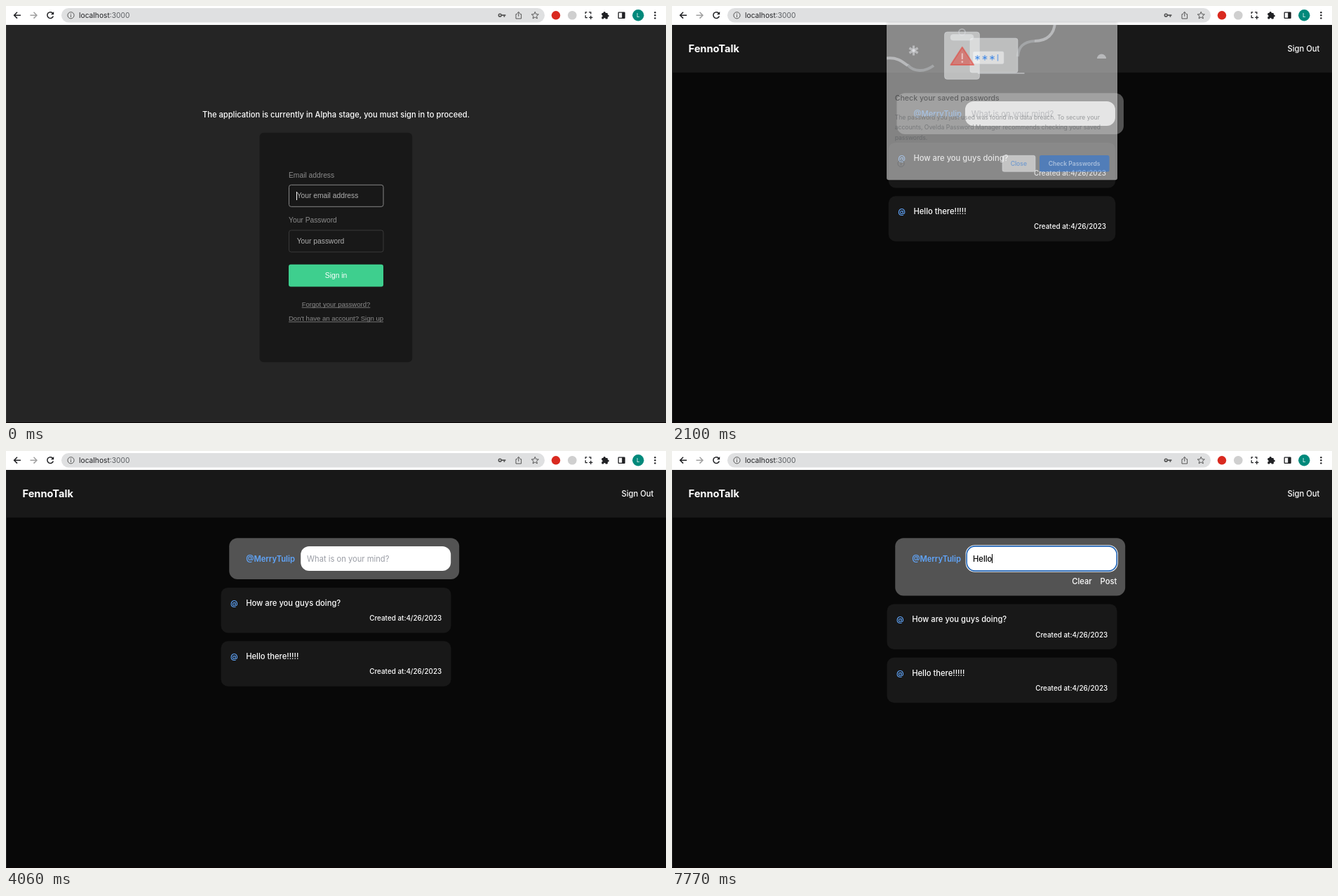
Recreate the animation shown at these times as an HTML page with a canvas. Size 941 by 595 pixels, loop 8 s.

```html
<!DOCTYPE html>
<html lang="en">
<head>
<meta charset="utf-8">
<title>Chat sign in</title>
<style>
html, body { margin: 0; width: 100%; height: 100%; overflow: hidden; background: #080808; }
canvas { display: block; width: 941px; height: 595px; }
</style>
</head>
<body>
<canvas id="stage" width="941" height="595"></canvas>
<script>
const c = document.getElementById('stage').getContext('2d');
const LOOP = 8000, STEP = 70;
const UI = 'Inter, "Open Sans", sans-serif';
const FORM = '"Liberation Sans", Arial, sans-serif';
const USER = '@MerryTulip';

const ramp = (t, from, to) => Math.min(1, Math.max(0, (t - from) / (to - from)));
const within = (t, from, to) => t >= from && t < to;

function box(x, y, w, h, r, fill, stroke, line = 1) {
  c.beginPath();
  c.roundRect(x, y, w, h, r);
  if (fill) { c.fillStyle = fill; c.fill(); }
  if (stroke) { c.strokeStyle = stroke; c.lineWidth = line; c.stroke(); }
}

function disc(x, y, r, fill) {
  c.beginPath();
  c.arc(x, y, r, 0, Math.PI * 2);
  c.fillStyle = fill;
  c.fill();
}

function ring(x, y, r, color, line = 1) {
  c.beginPath();
  c.arc(x, y, r, 0, Math.PI * 2);
  c.strokeStyle = color;
  c.lineWidth = line;
  c.stroke();
}

function path(d, color, line = 1.4) {
  c.strokeStyle = color;
  c.lineWidth = line;
  c.stroke(new Path2D(d));
}

function text(s, x, y, size, color, { weight = 400, family = UI, align = 'left' } = {}) {
  c.font = `${weight} ${size}px ${family}`;
  c.fillStyle = color;
  c.textAlign = align;
  c.fillText(s, x, y);
  return c.measureText(s).width;
}

function caret(x, y, h, color) {
  c.fillStyle = color;
  c.fillRect(x, y, 1, h);
}

function infoIcon(x, y, color) {
  ring(x, y, 4.6, color, 1);
  c.fillStyle = color;
  c.fillRect(x - 0.5, y - 0.5, 1, 3);
  c.fillRect(x - 0.5, y - 2.5, 1, 1.1);
}

function star(x, y, r) {
  c.beginPath();
  for (let i = 0; i < 10; i++) {
    const a = -Math.PI / 2 + i * Math.PI / 5, d = i % 2 ? r * 0.45 : r;
    c.lineTo(x + d * Math.cos(a), y + d * Math.sin(a));
  }
  c.closePath();
  c.strokeStyle = '#555';
  c.lineWidth = 1;
  c.stroke();
}

function toolbar() {
  const dark = '#202124', mid = '#555';
  c.fillStyle = '#fff';
  c.fillRect(0, 0, 941, 27);
  path('M21 13.2H11.8M16 8.8L11.6 13.2L16 17.6', dark, 1.5);
  path('M34.5 13.2H43.7M39.5 8.8L43.9 13.2L39.5 17.6', '#a0a0a0', 1.5);
  path('M66.8 10.4A4.4 4.4 0 1 0 67.4 14.6', dark, 1.5);
  c.fillStyle = dark;
  c.fill(new Path2D('M68.2 8V12.3H63.9Z'));

  box(79, 3, 689, 20.5, 10.2, '#dfe0e1');
  infoIcon(92.5, 13.3, mid);
  const host = text('localhost', 104, 17, 10.25, '#202124');
  text(':3000', 104 + host, 17, 10.25, '#5b5e62');

  ring(704.3, 13.2, 1.9, mid, 1.6);
  path('M706.3 13.2H712.4M710.4 13.2V15.7', mid, 1.7);
  path('M728.7 11.6H727V18H734.6V11.6H732.9M730.8 15V8.7M728.6 10.7L730.8 8.5L733 10.7', mid, 1);
  star(754.3, 13.6, 5.3);

  disc(784, 13.3, 6.2, '#d9291f');
  disc(807.3, 13.3, 6.3, '#cfcfcf');
  path('M826.2 11V8.8H828.4M831 8.8H833.8V11.4M826.2 13.2V16.6H829M833.8 13.8V19M831.2 16.4H836.4', dark, 1.3);

  box(849.3, 10, 8.6, 8.4, 1, dark);
  disc(853.2, 9.6, 1.6, dark);
  disc(858.2, 14, 1.6, dark);
  disc(849.2, 14.3, 1.3, '#fff');
  disc(853.4, 18.4, 1.3, '#fff');
  box(873.2, 9.2, 8.8, 8.2, 0.5, '#fff', dark, 1.3);
  c.fillStyle = dark;
  c.fillRect(878.2, 9, 4, 8.6);
  disc(901.3, 13.2, 8.2, '#00897b');
  text('L', 901.3, 16.2, 8, '#fff', { align: 'center' });
  for (const y of [9.2, 13.3, 17.4]) disc(925.4, y, 1.2, dark);
}

function pageEdges(color) {
  c.fillStyle = color;
  c.fillRect(0, 27, 1, 568);
  c.fillStyle = '#0c0505';
  c.fillRect(0, 594, 941, 1);
}

function link(s, y) {
  const w = text(s, 470.5, y, 9.55, '#8b8b8b', { family: FORM, align: 'center' });
  c.fillRect(470.5 - w / 2, y + 1.2, w, 0.8);
}

function field(y, placeholder, focused, filled) {
  box(403.5, y, 134.5, 31, 3, filled ? '#e8f0fe' : '#181818', focused ? '#858585' : filled ? '#3c3c3c' : '#393939');
  if (!filled) text(placeholder, 414.7, y + 19, 10.29, '#b0b0b0', { family: FORM });
}

function login(t) {
  const filled = t >= 280, sending = t >= 1260;
  const label = { family: FORM };
  c.fillStyle = '#252525';
  c.fillRect(0, 27, 941, 568);
  pageEdges('#343434');
  text('The application is currently in Alpha stage, you must sign in to proceed.',
    470.5, 158.5, 11.17, '#fff', { weight: 500, align: 'center' });
  box(361.5, 180.7, 217.8, 327.5, 6, '#181818');

  text('Email address', 403, 244.6, 10.29, '#8b8b8b', label);
  field(255.3, 'Your email address', !sending, filled);
  text('Your Password', 403, 309.3, 10.29, '#8b8b8b', label);
  field(320, 'Your password', false, filled);
  if (filled) {
    c.save();
    c.beginPath();
    c.rect(414, 256, 112.5, 30);
    c.clip();
    text('norvatoybox.com@pos', 414.7, 274.3, 10.29, '#000', label);
    c.restore();
    for (let i = 0; i < 9; i++) disc(416.6 + i * 8, 335, 1.25, '#111');
  }
  if (t < 980) caret(414, 265, 12, filled ? '#000' : '#fff');

  c.globalAlpha = 1 - 0.3 * ramp(t, 1260, 1470);
  box(403, 368.8, 135, 31.6, 3, '#3ecf8e');
  text(sending ? 'Signing in ...' : 'Sign in', 470.5, 388.2, 10.29, '#fff', { family: FORM, align: 'center' });
  c.globalAlpha = 1;

  link('Forgot your password?', 428.6);
  link("Don't have an account? Sign up", 449.2);
}

function message(x, y, w, body, hovered) {
  if (hovered) {
    box(x + 1.5, y + 1.2, w, 64.5, 10, '#1c0c0c');
    box(x + 0.8, y + 0.8, w - 1.6, 62.9, 9.5, '#181818', '#ef4444', 1.5);
  } else {
    box(x, y, w, 64.5, 10, '#181818');
  }
  text('@', x + 13.5, y + 26, 10.6, '#60a5fa', { weight: 600 });
  text(body, x + 35.7, y + 26, 11.2, '#fff', { weight: 500 });
  text('Created at:4/26/2023', x + w - 13.3, y + 47.2, 9.88, '#fff', { weight: 500, align: 'right' });
}

function typed(t) {
  const keys = [6510, 7210, 7420, 7560, 7770];
  return 'Hello'.slice(0, keys.filter(k => t >= k).length);
}

function composer(t, nameWidth) {
  const entry = typed(t);
  const w = nameWidth + 262, x = 482.2 - w / 2;
  const inputX = x + 36 + nameWidth;
  box(x, 124.3, w, entry ? 82.2 : 58.6, 12, '#535353');
  const name = t < 1820 ? '@' : USER;
  text(name, x + 24, 157.6, name === '@' ? 10.6 : 11.2, '#60a5fa', { weight: t < 3500 ? 500 : 600 });

  if (t >= 4760) {
    box(inputX - 1.6, 134.3, 217.2, 38.4, 13, '#fff');
    box(inputX, 135.9, 214, 35.2, 11.8, '#fff', '#1f63b5', 1.6);
  } else {
    box(inputX, 136, 214, 35, 12, '#fff');
  }
  const textX = inputX + 8.8;
  let end = textX;
  if (entry) end += text(entry, textX, 157.8, 11.2, '#000', { weight: 500 });
  else text('What is on your mind?', textX, 157.8, 11.2, '#9a9da5');
  const blink = within(t, 4760, 5250) || within(t, 5810, 6370) || within(t, 6510, 7000) || t >= 7210;
  if (blink) caret(Math.round(end), 147, 13, '#000');

  if (entry) {
    const action = { weight: 500, align: 'right' };
    text('Clear', 598.6, 190, 11.2, '#fff', action);
    text('Post', 634.3, 190, 11.2, '#fff', action);
  }
}

function chat(t) {
  c.fillStyle = '#080808';
  c.fillRect(0, 27, 941, 568);
  c.fillStyle = '#181818';
  c.fillRect(0, 27, 941, 68);
  pageEdges('#222');
  text('FennoTalk', 23.5, 66.2, 14.6, '#fff', { weight: 700 });
  text('Sign Out', 923.3, 65.4, 11.2, '#fff', { weight: 500, align: 'right' });

  const nameWidth = t < 1820 ? 10 : t < 3500 ? 61.5 : 66;
  composer(t, nameWidth);
  if (t >= 1820) {
    const w = nameWidth + 262, x = 470.5 - w / 2;
    const y = t >= 6510 ? 218.4 : 194.9;
    const hovered = within(t, 3920, 4060) || within(t, 5040, 6510);
    message(x, y, w, 'How are you guys doing?', hovered);
    message(x, y + 76.3, w, 'Hello there!!!!!', false);
  }

  c.globalAlpha = ramp(t, 5180, 5320) * (1 - ramp(t, 6720, 7000));
  c.fillStyle = '#e8e8e8';
  c.fillRect(0, 594, 251, 1);
  c.globalAlpha = 1;
}

function asterisk(x, y, r, color, line) {
  for (let i = 0; i < 3; i++) {
    const a = Math.PI / 2 + i * Math.PI / 3, dx = r * Math.cos(a), dy = r * Math.sin(a);
    path(`M${x - dx} ${y - dy}L${x + dx} ${y + dy}`, color, line);
  }
}

function breachArt() {
  const pale = '#e8eaed', grey = '#bdc1c6', edge = '#dadce0', blue = '#1a73e8';
  path('M306 74.5C320 73 327 78 336 85', pale, 4);
  path('M335.5 83.5C345 95 361 94 373 85', grey, 4);
  path('M493 72C494 58 501 51 517 50', grey, 4);
  path('M517 50C535 50 545 40 546 24', pale, 4);
  asterisk(344.5, 63.5, 7, pale, 3.2);
  c.beginPath();
  c.arc(612.5, 75, 6.5, Math.PI, 0);
  c.fillStyle = pale;
  c.fill();

  box(425, 46, 68, 49, 3, '#f1f3f4', edge);
  path('M436 96H502.5', edge, 1.8);
  box(388.5, 37, 50, 67.5, 4, '#f8f9fa', edge);
  ring(413.5, 37.3, 4.5, edge, 1.8);
  box(397, 40.5, 33, 8.5, 4, '#f1f3f4', edge);
  box(429, 65, 44, 17.5, 2, '#fff', edge);
  for (const x of [435.5, 446, 456.5]) asterisk(x, 73.8, 3.7, blue, 1.6);
  path('M464.5 69V78.5', blue, 1.5);

  c.lineJoin = 'round';
  const triangle = new Path2D('M413.8 58.8L430.2 84H397.4Z');
  c.fillStyle = c.strokeStyle = '#e33b30';
  c.lineWidth = 2;
  c.fill(triangle);
  c.stroke(triangle);
  c.lineJoin = 'miter';
  path('M413.8 67.5V76', '#fff', 2.2);
  disc(413.8, 79.7, 1.4, '#fff');
}

function warning(t) {
  const alpha = t < 3150 ? ramp(t, 2030, 2170) : 1 - ramp(t, 3150, 3360);
  if (alpha <= 0) return;
  c.save();
  c.globalAlpha = alpha;
  c.shadowColor = 'rgba(0,0,0,.4)';
  c.shadowBlur = 3;
  box(306, 24, 329, 224.3, [0, 0, 3, 3], '#fff');
  c.shadowColor = 'transparent';
  c.beginPath();
  c.rect(306, 24, 329, 224);
  c.clip();
  breachArt();
  text('Check your saved passwords', 317.7, 135.2, 10.6, '#202124', { weight: 500 });
  const lines = [
    'The password you just used was found in a data breach. To secure your',
    'accounts, Ovelda Password Manager recommends checking your saved',
    'passwords.'
  ];
  lines.forEach((s, i) => text(s, 317.7, 161.5 + i * 14.7, 8.6, '#4d5156'));
  infoIcon(326.5, 224.8, '#5f6368');
  const pressed = t >= 3080;
  box(471, 213.3, 47, 23, 2.5, pressed ? '#c9dbf3' : '#fff', pressed ? '#bfd1ec' : '#dadce0');
  text('Close', 494.3, 227.8, 8.6, '#1a6fdc', { weight: 500, align: 'center' });
  box(524, 213, 99.5, 23.6, 2.5, '#1a73e8');
  text('Check Passwords', 573.6, 227.8, 8.55, '#fff', { weight: 600, align: 'center' });
  c.restore();
}

function frame() {
  const t = Math.floor((performance.now() % LOOP) / STEP) * STEP;
  toolbar();
  if (t < 1750) login(t);
  else {
    chat(t);
    warning(t);
  }
  requestAnimationFrame(frame);
}
frame();
</script>
</body>
</html>
```
